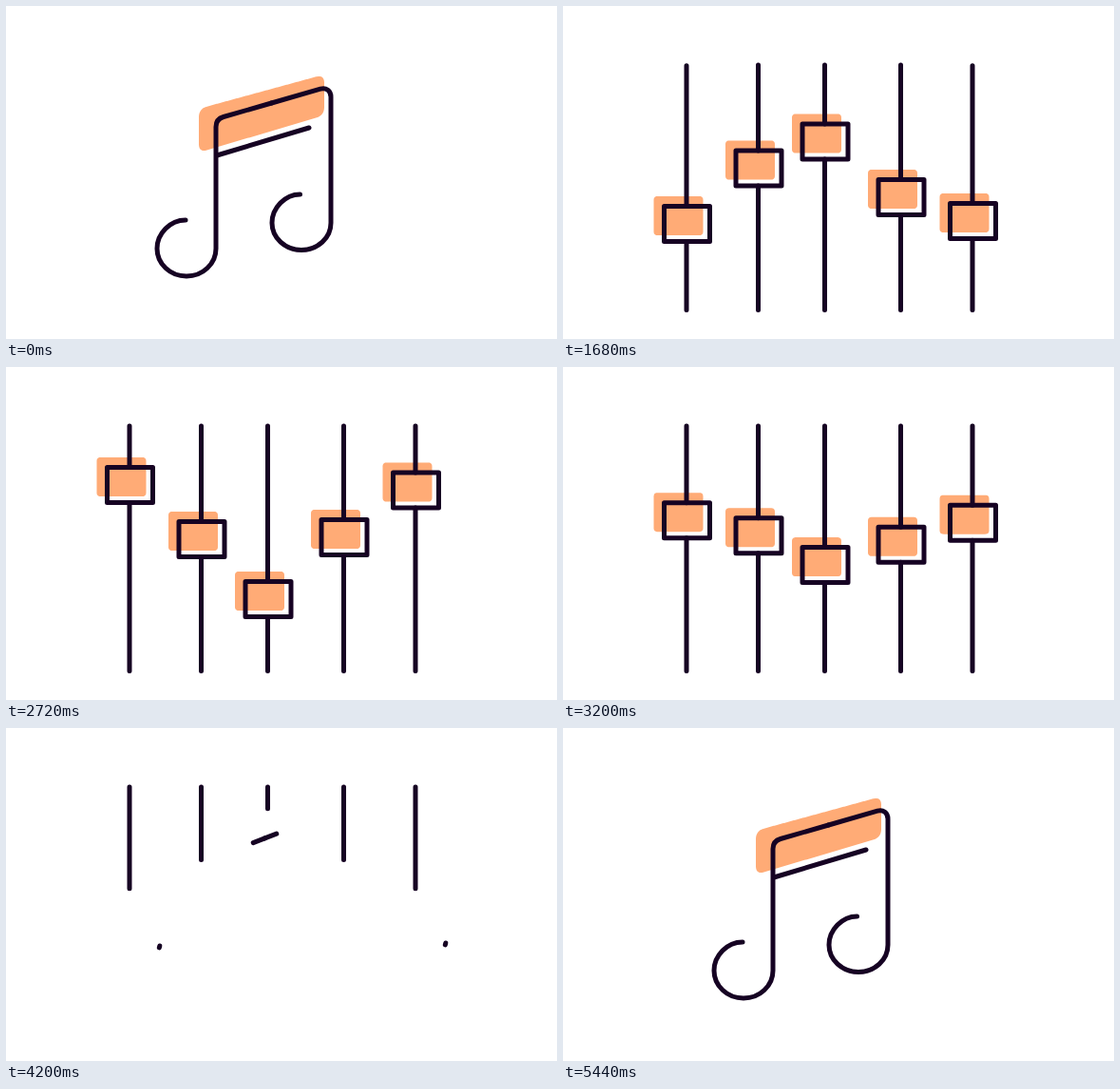
An HTML page for the animation above (5520 ms loop, 580x350 px).

```html
<!DOCTYPE html>
<html lang="en">
<head>
<meta charset="utf-8">
<title>Note and mixer</title>
<style>
  html, body { margin: 0; width: 100%; height: 100%; overflow: hidden; background: #fff; }
  svg { display: block; width: 580px; height: 350px; }
  .ink { fill: none; stroke: #160323; stroke-width: 5; stroke-linecap: round; stroke-linejoin: round; }
  .tint { fill: #ffab76; }
</style>
</head>
<body>
<svg id="stage" viewBox="0 0 580 350"></svg>
<script>
const LOOP = 5520;
const stage = document.getElementById('stage');

const lerp = (a, b, k) => a + (b - a) * k;
const ease = (t, from, to) => {
  const x = Math.min(1, Math.max(0, (t - from) / (to - from)));
  return x * x * (3 - 2 * x);
};
const add = (tag, cls, parent = stage) => {
  const el = document.createElementNS('http://www.w3.org/2000/svg', tag);
  if (cls) el.setAttribute('class', cls);
  return parent.appendChild(el);
};
const show = (el, on) => el.setAttribute('visibility', on ? 'visible' : 'hidden');
const deg = rad => rad * 180 / Math.PI;

// Show only the stretch of a path between two lengths.
function trim(el, a, b) {
  show(el, b - a > 0.3);
  el.setAttribute('stroke-dasharray', `${Math.max(0.01, b - a)} 9999`);
  el.setAttribute('stroke-dashoffset', -a);
}

// Outline of a polygon with soft corners, sampled evenly from its first corner.
function softOutline(pts, r, count) {
  const n = pts.length;
  const toward = (p, q) => {
    const k = r / Math.hypot(q[0] - p[0], q[1] - p[1]);
    return [lerp(p[0], q[0], k), lerp(p[1], q[1], k)];
  };
  const d = pts.map((p, i) => {
    const a = toward(p, pts[(i + n - 1) % n]), b = toward(p, pts[(i + 1) % n]);
    return `${i ? 'L' : 'M'}${a} Q${p} ${b}`;
  }).join(' ') + 'Z';
  const path = add('path');
  path.setAttribute('d', d);
  const len = path.getTotalLength();
  const out = [];
  for (let i = 0; i < count; i++) {
    const q = path.getPointAtLength(len * i / count);
    out.push(q.x.toFixed(2) + ',' + q.y.toFixed(2));
  }
  path.remove();
  return out;
}

// Fill of an outline that closes in on the corner opposite its start.
function partFill(el, outline, f) {
  const cut = Math.round(outline.length * (1 - f) / 2);
  show(el, f > 0.01);
  el.setAttribute('points', outline.slice(cut, outline.length - cut).join(' '));
}

/* ---- sliders ---- */
const HALF_W = 24, HALF_H = 18.5, TOP = 62, BASE = 319.5;
const tintOutline = softOutline([[17, 12], [-35, 12], [-35, -29], [17, -29]], 4, 240);

const sliders = [
  { x: 130, a: 229, b: 124, lag: 255 },
  { x: 205.5, a: 170.5, b: 181, lag: 175 },
  { x: 275.5, a: 142.5, b: 244, lag: 0 },
  { x: 355.5, a: 201, b: 179, lag: 175 },
  { x: 431, a: 226, b: 129.5, lag: 255 }
].map(s => {
  const back = add('g');
  s.tint = add('polygon', 'tint', back);
  s.line = add('path', 'ink');
  const front = add('g');
  s.box = add('path', 'ink', front);
  s.box.setAttribute('d', `M${HALF_W} ${HALF_H}V${-HALF_H}H${-HALF_W}V${HALF_H}H${HALF_W}`);
  s.groups = [back, front];
  return s;
});

function drawRail(s, t, y, solid) {
  const outer = s.lag > 200, centre = s.lag === 0;
  let top = TOP, base = BASE;
  if (outer) top = lerp(BASE, TOP, ease(t, 715, 1715));
  else if (centre) top = lerp(BASE, TOP, ease(t, 293, 1193));
  else if (t < 1220) top = BASE;
  base = lerp(BASE, TOP, ease(t, 3400 + s.lag, 4380 + s.lag));
  show(s.line, base - top > 0.5);
  const hi = y - HALF_H, lo = y + HALF_H;
  let d = `M${s.x} ${top}V${base}`;
  if (solid && base > lo) {
    d = `M${s.x} ${Math.max(top, lo)}V${base}`;
    if (top < hi) d += `M${s.x} ${top}V${hi}`;
  }
  s.line.setAttribute('d', d);
}

function drawSlider(s, t) {
  const k = ease(t, 1760, 2560) - ease(t, 2880, 3680);
  const y = lerp(s.a, s.b, k);
  const inn = ease(t, 1120, 1640);
  const out = ease(t, 3440 + s.lag, 3980 + s.lag);
  const turn = 0.06 * (1 - inn) + 0.247 * out;
  const tf = `translate(${s.x + 0.5} ${y}) rotate(${deg(turn)} 95 38)`;
  s.groups.forEach(g => g.setAttribute('transform', tf));

  const kept = inn * (1 - out);
  trim(s.box, 0, kept * 4 * (HALF_W + HALF_H));
  partFill(s.tint, tintOutline, inn * (1 - ease(t, 3480, 3880)));
  drawRail(s, t, y, kept > 0.5);
}

/* ---- note ---- */
const note = add('g');
const noteTint = add('polygon', 'tint', note);
const noteOutline = softOutline([[335, 115], [203, 154], [203, 108], [335, 72]], 9, 400);
const bar = add('path', 'ink', note);

const halves = [
  { head: 'M279.5 102L229 116.5Q221 118.8 221 127', x: 221, b: 255, ry: 29, tip: [189, 225], end: 205.5 },
  { head: 'M279.5 102L331 87.2C337 85.5 342 89 342 95.5', x: 342, b: 228, ry: 28.5, tip: [309.5, 198], end: 355.8 }
].map(h => Object.assign(h, { el: add('path', 'ink', note) }));

// m turns the round hook into a tight U-turn; rise lifts the tip up the rail.
function halfPath(h, m, rise) {
  const K = 0.552, x = h.x;
  const r = lerp(31, (x - h.end) / 2, m);
  const ry = lerp(h.ry, 7, m), b = lerp(h.b, 322, m);
  const far = x - 2 * r, low = b + ry;
  const tx = lerp(h.tip[0], h.end, m), ty = lerp(h.tip[1], TOP, rise);
  const c1 = lerp(b - K * ry, lerp(b, ty, 1 / 3), m);
  const c2x = lerp(x - r - K * r, h.end, m), c2y = lerp(ty, lerp(b, ty, 2 / 3), m);
  return `${h.head}V${b}C${x} ${b + K * ry} ${x - r + K * r} ${low} ${x - r} ${low}` +
    `C${x - r - K * r} ${low} ${far} ${b + K * ry} ${far} ${b}` +
    `C${far} ${c1} ${c2x} ${c2y} ${tx} ${ty}`;
}

function drawNote(t) {
  const leaving = t < 2000;
  const turn = leaving ? 0 : -0.092 * (1 - ease(t, 4040, 5240));
  note.setAttribute('transform', `rotate(${deg(turn)} 435 190)`);

  const m = leaving ? ease(t, 200, 680) : 0;
  const rise = leaving ? ease(t, 200, 1100) : 0;
  halves.forEach(h => {
    h.el.setAttribute('d', halfPath(h, m, rise));
    const len = h.el.getTotalLength();
    if (leaving) {
      const rail = len - (BASE - TOP);
      const start = t < 1220 ? ease(t, 200, 1220) * Math.max(rail, 0) : len;
      trim(h.el, start, len);
    } else {
      trim(h.el, 0, len * ease(t, 4040, 5400));
    }
  });

  const go = ease(t, 200, 1040), come = ease(t, 4840, 5400);
  show(bar, leaving ? t < 1040 : come > 0.005);
  bar.setAttribute('d', leaving
    ? `M${lerp(222, 298.3, go)} ${lerp(157, 182.4, go)}L${lerp(319, 301.3, go)} ${lerp(128, 181.6, go)}`
    : `M222 157L${lerp(222, 319, come)} ${lerp(157, 128, come)}`);

  partFill(noteTint, noteOutline, leaving ? 1 - ease(t, 200, 640) : ease(t, 4780, 5280));
}

function draw(t) {
  sliders.forEach(s => drawSlider(s, t));
  drawNote(t);
}

const began = performance.now();
function tick() {
  draw((performance.now() - began) % LOOP);
  requestAnimationFrame(tick);
}
draw(0);
requestAnimationFrame(tick);
</script>
</body>
</html>
```
